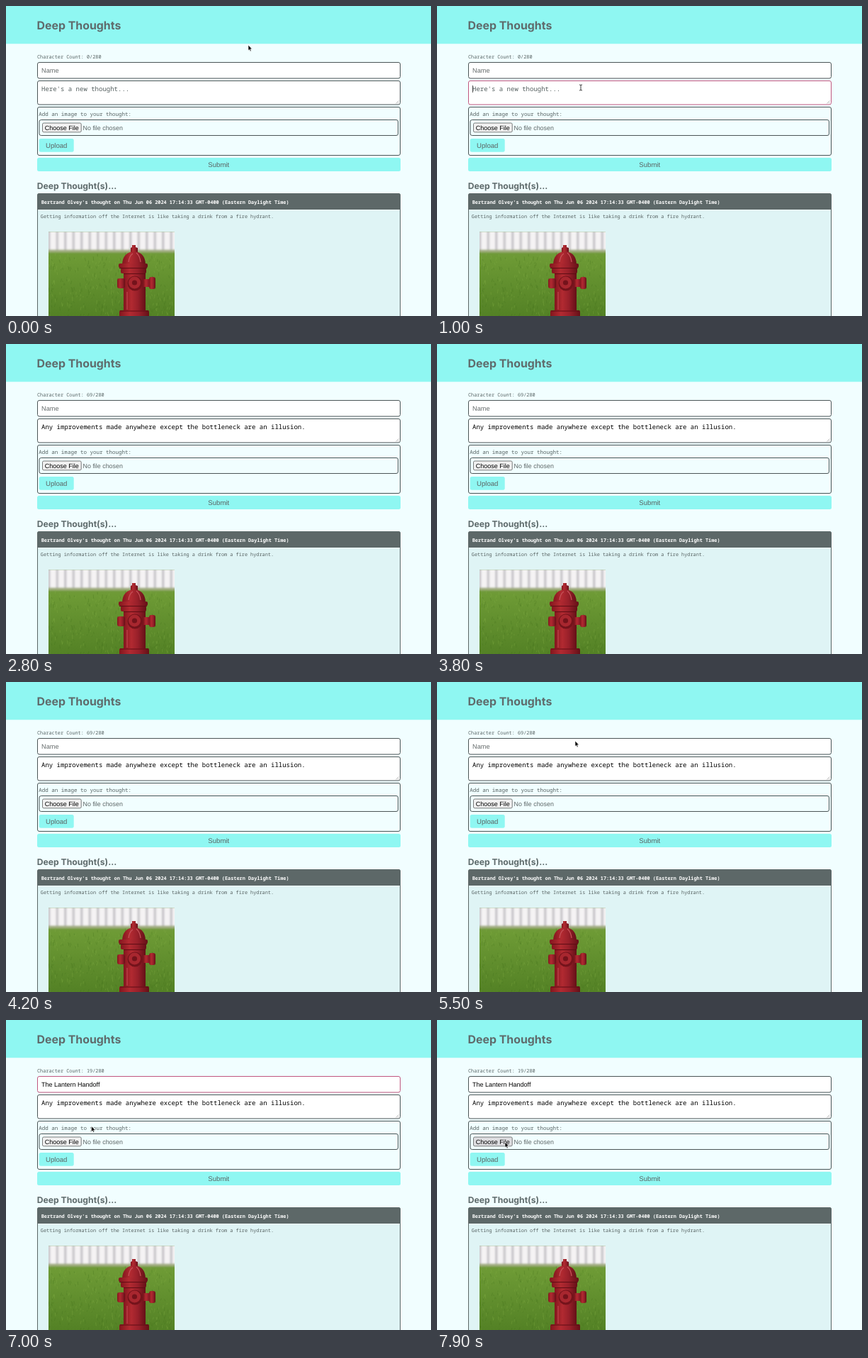
Animation of 600 by 437 pixels, one loop 8000 ms. Source, as an HTML page:

```html
<!DOCTYPE html>
<html lang="en">
<head>
<meta charset="utf-8">
<title>Deep Thoughts</title>
<style>
  html, body { margin: 0; width: 100%; height: 100%; overflow: hidden; background: #f1feff; }
  svg { display: block; width: 100%; height: 100%; }
  text { fill: #5c6464; text-rendering: geometricPrecision; white-space: pre; }
  .head { font-family: Inter, sans-serif; font-weight: 700; fill: #5f6b6c; }
  .mono { font-family: "Noto Sans Mono", monospace; font-size: 6.86px; fill: #566161; }
  .sans { font-family: "Liberation Sans", Arial, sans-serif; font-size: 9.1px; }
  .btn { font-size: 9.65px; }
  .entry { font-size: 9px; fill: #000; }
  .menu { font: 500 6px Inter, sans-serif; fill: #111; }
  .field { fill: #fff; stroke: #4b5556; }
  .plain { fill: none; }
  .aqua { fill: #8ff7f2; }
  .focus { stroke: #c0567f; }
</style>
</head>
<body>
<svg viewBox="0 0 600 437" preserveAspectRatio="none">
  <defs>
    <linearGradient id="grass" x1="0" y1="0" x2="0" y2="1">
      <stop offset="0" stop-color="#78984a"/>
      <stop offset=".3" stop-color="#6d9a35"/>
      <stop offset="1" stop-color="#538125"/>
    </linearGradient>
    <linearGradient id="red">
      <stop offset="0" stop-color="#82161d"/>
      <stop offset=".35" stop-color="#b22a31"/>
      <stop offset=".65" stop-color="#98202a"/>
      <stop offset="1" stop-color="#641017"/>
    </linearGradient>
    <pattern id="fence" width="11.5" height="40" x="61" y="315" patternUnits="userSpaceOnUse">
      <rect width="11.5" height="40" fill="#c9c7cb"/>
      <rect x="1.5" width="8" height="40" fill="#f5f3f4"/>
    </pattern>
    <filter id="soft"><feGaussianBlur stdDeviation="1.2"/></filter>
    <filter id="shade" x="-20%" y="-20%" width="140%" height="140%">
      <feDropShadow dx="0" dy="1" stdDeviation="1.8" flood-opacity=".28"/>
    </filter>
    <clipPath id="photo"><rect x="60" y="318.5" width="178" height="119"/></clipPath>
  </defs>

  <rect width="600" height="437" fill="#f1feff"/>
  <rect class="aqua" width="600" height="53.3"/>
  <text class="head" x="43.5" y="32.5" font-size="15.9">Deep Thoughts</text>

  <text class="mono" id="count" x="44" y="74"></text>
  <rect class="field" id="nameBox" x="44.5" y="79.5" width="512" height="22.5" rx="2.5"/>
  <text class="sans" id="nameText" x="50" y="94"></text>
  <rect class="field" id="thoughtBox" x="44.5" y="105.5" width="512" height="33.5" rx="2.5"/>
  <text class="mono" id="thoughtText" x="50" y="120" style="font-size:9px"></text>
  <path d="M550.5 137.5l4-4M553 137.5l1.5-1.5" stroke="#888" stroke-width=".6"/>

  <rect class="field plain" x="44.5" y="142.5" width="512" height="68" rx="2.5"/>
  <text class="mono" x="46.3" y="154.5" style="font-size:7.53px">Add an image to your thought:</text>
  <rect class="field plain" x="47" y="160.5" width="506.5" height="22" rx="2.5"/>
  <rect id="choose" x="51.5" y="165" width="54.7" height="12.8" rx="1.8" stroke="#6b6b6b" stroke-width=".9"/>
  <text class="sans entry" x="54.8" y="174.5">Choose File</text>
  <text class="sans" x="108.6" y="174.5" style="font-size:8.9px">No file chosen</text>
  <rect class="aqua" x="46.7" y="187" width="49" height="18.8" rx="2.5"/>
  <text class="sans btn" x="71.2" y="199.7" text-anchor="middle">Upload</text>
  <rect class="aqua" x="44" y="214" width="513" height="19" rx="2.5"/>
  <text class="sans btn" x="300.3" y="227" text-anchor="middle">Submit</text>

  <text class="head" x="43.7" y="258" font-size="12.2">Deep Thought(s)...</text>
  <path d="M44.5 440V267q0-2.500 2.500-2.500H554q2.500 0 2.500 2.500V440" fill="#dff4f5" stroke="#5b6666"/>
  <path d="M44 287V267q0-3 3-3H554q3 0 3 3V287Z" fill="#5d6868"/>
  <path d="M45 287.500H556" stroke="#f1feff"/>
  <text class="mono" x="49.7" y="278.6" style="fill:#fff;font-weight:700">Bertrand Olvey's thought on Thu Jun 06 2024 17:14:33 GMT-0400 (Eastern Daylight Time)</text>
  <text class="mono" x="48.8" y="299">Getting information off the Internet is like taking a drink from a fire hydrant.</text>

  <g clip-path="url(#photo)">
    <rect x="60" y="318" width="178" height="120" fill="url(#grass)"/>
    <g filter="url(#soft)">
      <rect x="55" y="310" width="190" height="34" fill="url(#fence)"/>
      <rect x="55" y="343.500" width="190" height="4" fill="#a2ae82"/>
    </g>
    <g id="blades" stroke-width=".7"></g>
    <g fill="url(#red)">
      <path d="M176 347v-6l2-1v-3h5v3l3 1v6Z"/>
      <path d="M164 364q1-17 17-18 15 1 16 18Z"/>
      <rect x="166" y="370" width="31" height="62"/>
      <rect x="159" y="363" width="41" height="6" rx="2"/>
      <rect x="162" y="369" width="36" height="8" rx="2"/>
      <rect x="157" y="384" width="11" height="14" rx="3"/>
      <rect x="194" y="385" width="10" height="11"/>
      <rect x="202" y="382" width="9" height="17" rx="3"/>
      <rect x="160" y="429" width="42" height="12" rx="2"/>
    </g>
    <path d="M160 369.500h39M166 377.500h31M161 430h40" stroke="#5e0d14" fill="none"/>
    <path d="M173 361q1-9 6-12M184 348q5 4 6 13" stroke="#c7535a" stroke-width="1.200" fill="none"/>
    <circle cx="182" cy="391" r="10.500" fill="#74131b"/>
    <circle cx="181.500" cy="390" r="8.500" fill="#a8272f"/>
    <circle cx="181.500" cy="390" r="3.600" fill="#74131b"/>
    <path d="M171 403v25" stroke="#c1474d" stroke-width="2" opacity=".6"/>
  </g>

  <path id="caret" stroke="#222" stroke-width=".8"/>
  <g id="menu">
    <path d="M92.500 106H95.500L99 102.800 102.500 106H199.500q2.500 0 2.500 2.500V208.500q0 2.500-2.500 2.500H92.500q-2.500 0-2.500-2.500V108.500q0-2.500 2.500-2.500Z" fill="#fff" filter="url(#shade)"/>
  </g>
  <path id="arrow" d="M0 0V7.700L1.700 6.200 2.900 8.900 4.200 8.300 3 5.700H5.400Z" fill="#000" stroke="#fff" stroke-width=".6"/>
  <path id="beam" d="M-2-4Q0-4 0-3 0-4 2-4M0-3V3M-2 4Q0 4 0 3 0 4 2 4" fill="none" stroke="#222" stroke-width=".9"/>
</svg>
<script>
const $ = id => document.getElementById(id);
const LOOP = 8000, STEP = 100;
const NAME = 'The Lantern Handoff';
const THOUGHT = 'Any improvements made anywhere except the bottleneck are an illusion.';
const SUGGESTIONS = ['rosfern', 'ros', 'rosalind.fernbrooke@examp....', 'opal58@example.com', 'rose52', 'rfernbrooke'];

// Pointer stops: time, x, y
const POINTER = [
  [0, 342, 55], [500, 203, 115], [4700, 203, 115], [4800, 452, 2], [4900, 286, 10],
  [5100, 286, 10], [5500, 195, 83], [5600, 195, 83], [5800, 191, 86],
  [6600, 191, 86], [7200, 96, 172], [LOOP, 96, 172]
];

const within = (v, from, to) => v >= from && v < to;
const show = (el, on) => el.setAttribute('visibility', on ? 'visible' : 'hidden');
const blinkOn = (t, since) => (t - since) % 1000 < 500;

function svg(tag, parent, attrs) {
  const el = document.createElementNS($('menu').namespaceURI, tag);
  for (const key in attrs) el.setAttribute(key, attrs[key]);
  return parent.appendChild(el);
}

function pointerAt(t) {
  const i = POINTER.findIndex(stop => stop[0] > t);
  const [t0, x0, y0] = POINTER[i - 1], [t1, x1, y1] = POINTER[i];
  const p = (t - t0) / (t1 - t0), e = p * p * (3 - 2 * p);
  return [x0 + (x1 - x0) * e, y0 + (y1 - y0) * e];
}

function setEntry(el, value, placeholder, color) {
  el.textContent = value || placeholder;
  el.style.fill = value ? '#000' : color;
}

function render(t) {
  const thought = t >= 1800 ? THOUGHT : '';
  const name = t >= 6400 ? NAME : '';
  const thoughtFocus = within(t, 800, 2600);
  const nameFocus = within(t, 5700, 7500);

  $('count').textContent = `Character Count: ${(name || thought).length}/280`;
  setEntry($('thoughtText'), thought, "Here's a new thought...", '#566161');
  setEntry($('nameText'), name, 'Name', '#666c6c');
  $('nameText').style.fontSize = name ? '9px' : '9.2px';
  $('thoughtBox').classList.toggle('focus', thoughtFocus);
  $('nameBox').classList.toggle('focus', nameFocus);
  show($('menu'), within(t, 5900, 6400));

  const since = thoughtFocus ? (thought ? 1800 : 800) : (name ? 6400 : 5700);
  const field = thoughtFocus ? $('thoughtText') : $('nameText');
  const filled = thoughtFocus ? thought : name;
  const x = 50.4 + (filled ? field.getComputedTextLength() : 0);
  $('caret').setAttribute('d', thoughtFocus ? `M${x} 112V122` : `M${x} 85.500V95.500`);
  show($('caret'), (thoughtFocus || nameFocus) && blinkOn(t, since));

  const [px, py] = pointerAt(t);
  const visible = !within(t, 2600, 4800);
  const overText = (within(py, 80, 102) || within(py, 105, 139)) && !within(t, 4800, 5700);
  for (const id of ['arrow', 'beam']) {
    $(id).setAttribute('transform', `translate(${px} ${py})`);
    show($(id), visible && overText === (id === 'beam'));
  }
  const hover = within(py, 165, 178) && within(px, 51, 107);
  $('choose').setAttribute('fill', !hover || t === 7500 ? '#f1f1f1' : '#dedee1');
}

SUGGESTIONS.forEach((label, i) => {
  svg('text', $('menu'), { class: 'menu', x: 95.2, y: 119.2 + i * 16.8 }).textContent = label;
});

let seed = 7;
const random = () => (seed = seed * 16807 % 2147483647) / 2147483647;
for (let i = 0; i < 420; i++) {
  const x = 60 + random() * 178, y = 352 + random() * 87;
  svg('path', $('blades'), {
    d: `M${x} ${y}l${random() * 3 - 1.5} ${-2 - random() * 4}`,
    stroke: random() < .5 ? '#86b048' : '#42701c',
    opacity: .45
  });
}

function tick(now) {
  render(Math.floor(now % LOOP / STEP) * STEP);
  requestAnimationFrame(tick);
}
render(0);
requestAnimationFrame(tick);
</script>
</body>
</html>
```
